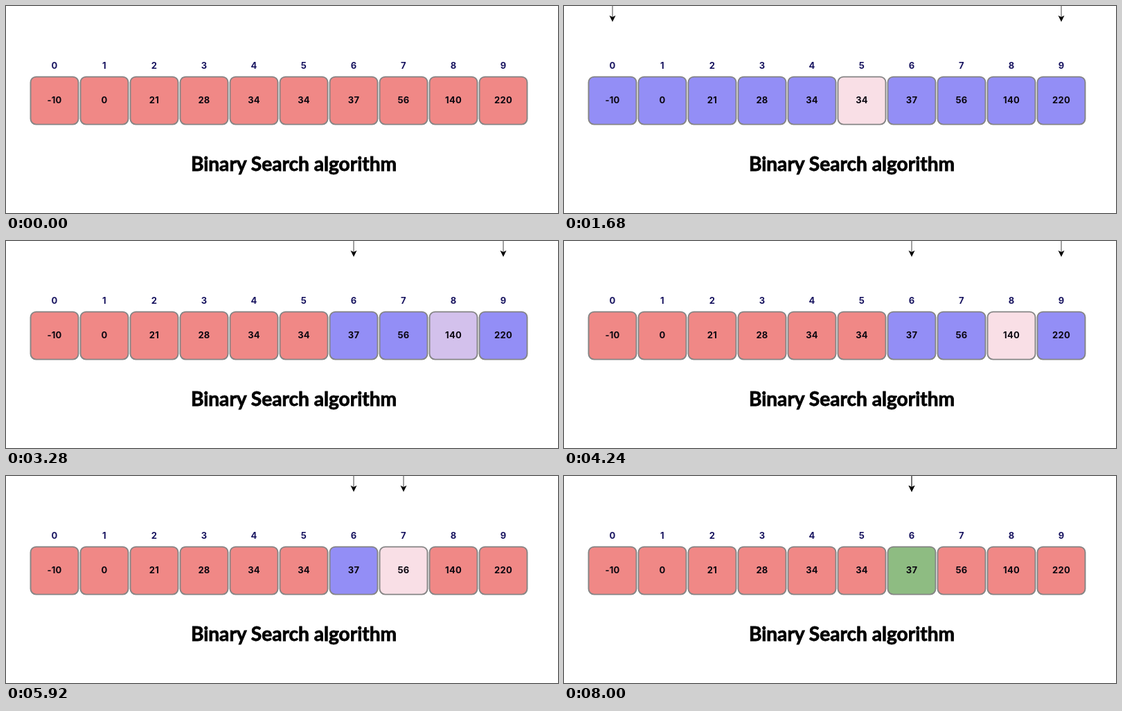
An HTML page that plays this animation: 797 px wide and 300 px high, repeating every 8.08 s.

```html
<!DOCTYPE html>
<html lang="en">
<head>
<meta charset="utf-8">
<title>Binary Search algorithm</title>
<style>
  html, body { margin: 0; width: 100%; height: 100%; overflow: hidden; background: #fff; }
  svg { display: block; width: 797px; height: 300px; }
  text { text-anchor: middle; }
  .cell { stroke: #858585; stroke-width: 1.9; }
  .value, .index { font: 700 13px Inter, sans-serif; letter-spacing: .25px; fill: #0b0710; }
  .index { fill: #17135f; }
  .title { font: 700 28.1px Lato, sans-serif; stroke: #000; stroke-width: .8; }
  .shaft { stroke: #444; stroke-width: 1; }
</style>
</head>
<body>
<svg id="stage" viewBox="0 0 797 300">
  <text class="title" x="415.5" y="239.2">Binary Search algorithm</text>
</svg>
<script>
const LOOP = 8080;
const RED = '#f08886', PURPLE = '#938ef6', LIGHT = '#f9dfe6', GREEN = '#8ebc82';
const DUSK = '#928fc8', BLUSH = '#f8c8c9';
const VALUES = [-10, 0, 21, 28, 34, 34, 37, 56, 140, 220];
const stage = document.getElementById('stage');
const centre = i => 70 + 72 * i;

function add(parent, tag, attrs, text) {
  const el = document.createElementNS('http://www.w3.org/2000/svg', tag);
  for (const k in attrs) el.setAttribute(k, attrs[k]);
  if (text !== undefined) el.textContent = text;
  return parent.appendChild(el);
}

// Each step is [start ms, duration ms, new value].
function play(el, prop, first, steps) {
  const frames = [{ offset: 0, [prop]: first }];
  let now = first;
  for (const [start, length, next] of steps) {
    frames.push({ offset: start / LOOP, [prop]: now, easing: 'ease' });
    frames.push({ offset: (start + length) / LOOP, [prop]: next });
    now = next;
  }
  frames.push({ offset: 1, [prop]: now });
  el.animate(frames, { duration: LOOP, iterations: Infinity });
}

const probe = (t, colour = LIGHT) => [[t, 500, colour]];
const discard = (t, via) => [[t, 90, via], [t + 90, 240, RED]];

function cellSteps(i) {
  if (i < 5) return discard(2870, DUSK);
  return {
    5: [...probe(1100), ...discard(2870, BLUSH)],
    6: probe(7100, GREEN),
    7: [...probe(5100), ...discard(6870, BLUSH)],
    8: [...probe(3100), ...discard(4870, BLUSH)],
    9: discard(4870, DUSK)
  }[i];
}

VALUES.forEach((value, i) => {
  const x = centre(i);
  const cell = add(stage, 'rect',
    { class: 'cell', x: x - 34.5, y: 102.6, width: 69, height: 69, rx: 8 });
  play(cell, 'fill', RED, [[60, 350, PURPLE], ...cellSteps(i)]);
  add(stage, 'text', { class: 'value', x, y: 141.3 }, value);
  add(stage, 'text', { class: 'index', x, y: 91.3 }, i);
});

function arrow(from, moves) {
  const at = (i, y = 0) => `translate(${centre(i)}px, ${y}px)`;
  const g = add(stage, 'g', {});
  add(g, 'path', { class: 'shaft', d: 'M0 -40V16' });
  add(g, 'path', { d: 'M0 23L-4.5 13.8L0 16L4.5 13.8Z' });
  play(g, 'transform', at(from, -40),
    [[450, 480, at(from)], ...moves.map(([t, i]) => [t, 470, at(i)])]);
}

arrow(0, [[2430, 6]]);
arrow(9, [[4430, 7], [6430, 6]]);
</script>
</body>
</html>
```
